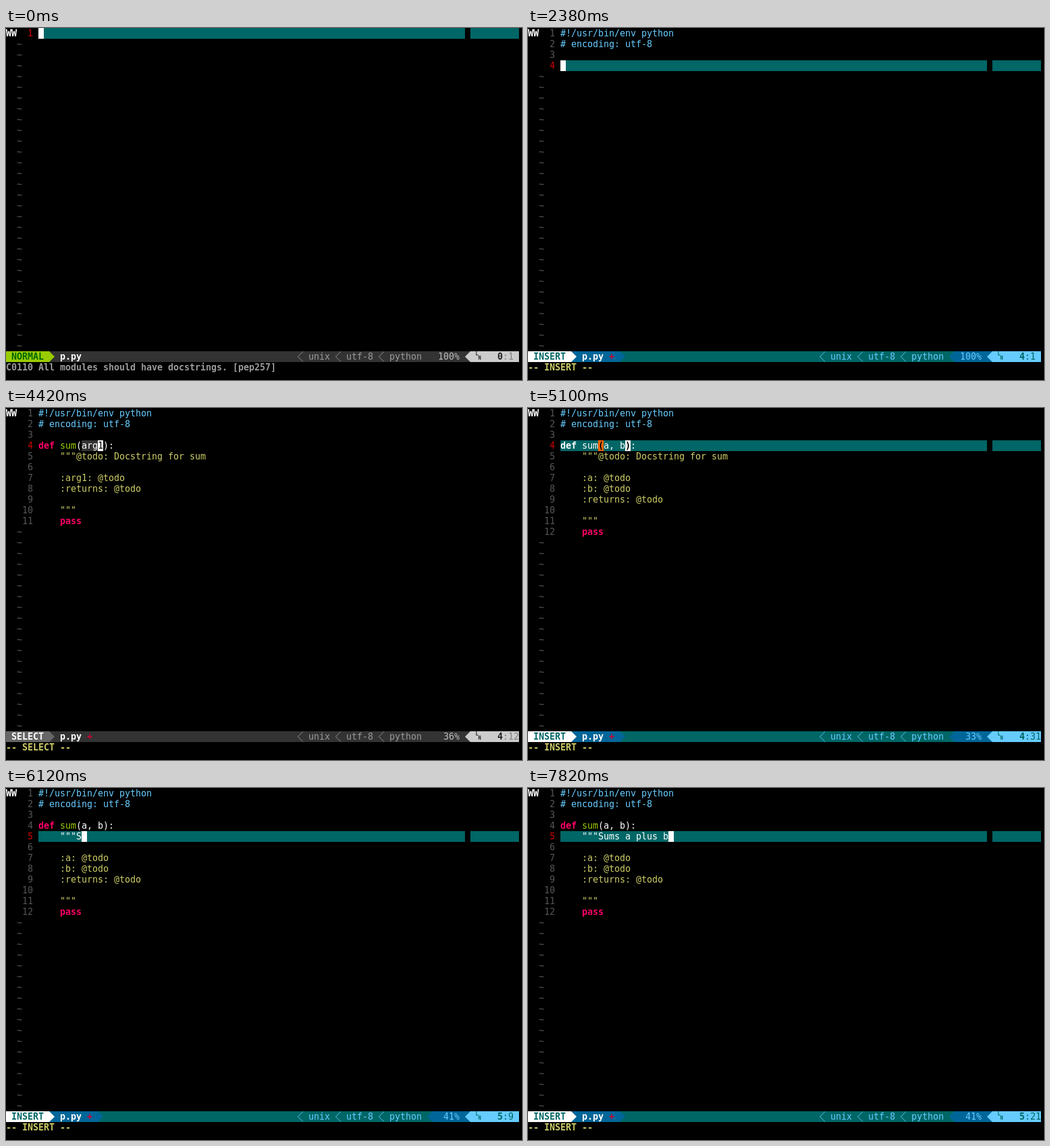
Recreate the animation shown at these times as an HTML page with a canvas. Size 860 by 588 pixels, loop 8000 ms.

```html
<!DOCTYPE html>
<html lang="en">
<head>
<meta charset="utf-8">
<title>Terminal editor</title>
<style>
html, body { margin: 0; width: 100%; height: 100%; overflow: hidden; background: #000; }
canvas { display: block; }
</style>
</head>
<body>
<canvas id="stage" width="860" height="588"></canvas>
<script>
const ctx = document.getElementById('stage').getContext('2d');
const CW = 9, CH = 18, COLS = 95, TEXT = 6, GUIDE = 85, STATUS = 30, LOOP = 8000;
const TEAL = '#006666', SKY = '#66ccff', YELLOW = '#cccc66', PINK = '#ff0066', LIME = '#99cc00';

const insertBar = {
  bg: TEAL, tag: '#ffffff', tagText: TEAL, file: '#006699', info: SKY,
  pct: '#006699', pctText: SKY, pos: SKY, line: TEAL, col: TEAL
};
const grayBar = {
  bg: '#333333', tag: LIME, tagText: '#006600', file: '#333333', info: '#999999',
  pct: '#333333', pctText: '#bbbbbb', pos: '#cccccc', line: '#222222', col: '#808080'
};
const bars = {
  NORMAL: grayBar,
  INSERT: insertBar,
  SELECT: { ...grayBar, tag: '#666666', tagText: '#ffffff' }
};

const head = ['#!/usr/bin/env python', '# encoding: utf-8', ''];

function body(name, sig, doc, args) {
  return [...head, `def ${name}(${sig}):`, `    """${doc}`, '',
    ...args.map(a => `    :${a}: @todo`), '    :returns: @todo', '', '    """', '    pass'];
}
const stub = name => '@todo: Docstring for ' + name;
const summed = doc => body('sum', 'a, b', doc, ['a', 'b']);
const one = (name, sig, docName, arg) => body(name, sig, stub(docName), [arg]);

// Each step: start, mode, lines, cursor row and column, plus optional details.
const steps = [];
function step(at, mode, lines, row, col, more = {}) {
  steps.push({ at, mode, lines, row, col, pos: `${row + 1}:${col + 1}`, ...more });
}
step(0, 'NORMAL', [''], 0, 0, { pos: '0:1', clean: true });
step(340, 'INSERT', [''], 0, 0, { pos: '0:1', clean: true });
step(1360, 'INSERT', ['#!'], 0, 2);
step(1700, 'INSERT', head, 2, 0);
step(2380, 'INSERT', [...head, ''], 3, 0);
step(2720, 'INSERT', [...head, 'd'], 3, 1);
step(3060, 'INSERT', [...head, 'de'], 3, 2, { match: true });
step(3400, 'INSERT', one('s', 'arg1', 's', 'arg1'), 3, 5, { pos: '4:29', pair: 10 });
step(3740, 'INSERT', one('su', 'arg1', 's', 'arg1'), 3, 6, { pos: '4:29', pair: 11, match: true });
step(4080, 'INSERT', one('sum', 'arg1', 'sum', 'arg1'), 3, 7, { pos: '4:31', pair: 12, match: true });
step(4420, 'SELECT', one('sum', 'arg1', 'sum', 'arg1'), 3, 11, { from: 8 });
step(4760, 'INSERT', one('sum', 'a,', 'sum', 'a'), 3, 10, { pair: 7 });
step(5100, 'INSERT', summed(stub('sum')), 3, 12, { pos: '4:31', pair: 7 });
step(5440, 'SELECT', summed(stub('sum')), 4, 30, { from: 7 });
function typed(at, text, match) {
  step(at, 'INSERT', summed(text), 4, 7 + text.length, { match });
}
typed(6120, 'S');
typed(6460, 'Su', true);
typed(6800, 'Sums a ');
typed(7140, 'Sums a p');
typed(7480, 'Sums a pl', true);
typed(7820, 'Sums a plus b');

function fill(col, row, n, color) {
  ctx.fillStyle = color;
  ctx.fillRect(col * CW, row * CH, n * CW, CH);
}

function put(text, col, row, color, bold) {
  ctx.font = (bold ? 'bold ' : '') + '15px "DejaVu Sans Mono", monospace';
  ctx.fillStyle = color;
  [...text].forEach((ch, i) => {
    if (ch !== ' ') ctx.fillText(ch, (col + i) * CW, row * CH + 14);
  });
}

function arrow(col, color, back, left) {
  fill(col, STATUS, 1, back);
  const x = col * CW, y = STATUS * CH;
  const base = left ? x + CW : x, tip = left ? x : x + CW;
  ctx.fillStyle = color;
  ctx.beginPath();
  ctx.moveTo(base, y);
  ctx.lineTo(tip, y + CH / 2);
  ctx.lineTo(base, y + CH);
  ctx.fill();
}

function chevron(col, color) {
  const x = col * CW, y = STATUS * CH;
  ctx.strokeStyle = color;
  ctx.lineWidth = 1;
  ctx.beginPath();
  ctx.moveTo(x + CW, y + 0.5);
  ctx.lineTo(x + 0.5, y + CH / 2);
  ctx.lineTo(x + CW, y + CH - 0.5);
  ctx.stroke();
}

function code(text, row, plain) {
  const def = /^def (\w+)/.exec(text);
  if (def) {
    put(text, TEXT, row, '#ffffff');
    fill(TEXT, row, 4 + def[1].length, plain ? TEAL : '#000000');
    put('def', TEXT, row, plain ? '#ffffff' : PINK, true);
    put(def[1], TEXT + 4, row, plain ? '#ffffff' : LIME);
  } else if (plain) {
    put(text, TEXT, row, '#ffffff');
  } else {
    const pass = text.trim() === 'pass';
    put(text, TEXT, row, pass ? PINK : text[0] === '#' ? SKY : YELLOW, pass);
  }
}

function statusBar(s) {
  const c = bars[s.mode], end = s.clean ? 15 : 17;
  fill(0, STATUS, COLS, c.bg);
  fill(0, STATUS, 8, c.tag);
  put(s.mode, 1, STATUS, c.tagText, true);
  fill(8, STATUS, end - 8, c.file);
  arrow(8, c.tag, c.file);
  arrow(end, c.file, c.bg);
  put('p.py', 10, STATUS, '#ffffff', true);
  if (!s.clean) put('+', 15, STATUS, '#cc0033', true);

  [[54, 'unix'], [61, 'utf-8'], [69, 'python']].forEach(([col, label]) => {
    chevron(col, c.info);
    put(label, col + 2, STATUS, c.info);
  });
  arrow(78, c.pct, c.bg, true);
  fill(79, STATUS, 6, c.pct);
  const pct = Math.floor((s.row + 1) * 100 / s.lines.length) + '%';
  put(pct.padStart(4), 80, STATUS, c.pctText);
  arrow(85, c.pos, c.pct, true);
  fill(86, STATUS, 9, c.pos);
  ctx.font = 'bold 8px "DejaVu Sans Mono", monospace';
  ctx.fillStyle = c.line;
  ctx.fillText('L', 782.5, 547);
  ctx.fillText('N', 787, 554);
  put(s.pos[0], 91, STATUS, c.line, true);
  put(s.pos.slice(1), 92, STATUS, c.col);
}

function message(s) {
  const row = STATUS + 1;
  if (s.mode === 'NORMAL') {
    put('C0110 All modules should have docstrings. [pep257]', 0, row, '#999999', true);
  } else if (s.match) {
    put('-- User defined completion (^U^N^P)', 0, row, YELLOW, true);
    put('match 1 of 2', 36, row, SKY, true);
  } else {
    put(`-- ${s.mode} --`, 0, row, YELLOW, true);
  }
}

function draw(s) {
  ctx.fillStyle = '#000000';
  ctx.fillRect(0, 0, 860, 588);
  const selecting = s.mode === 'SELECT';
  if (!selecting) {
    fill(TEXT, s.row, COLS - TEXT, TEAL);
    fill(GUIDE, s.row, 1, '#000000');
  }
  put('WW', 0, 0, '#ffffff', true);
  for (let r = 0; r < STATUS; r++) {
    if (r >= s.lines.length) {
      put('~', 2, r, '#555555');
      continue;
    }
    const here = r === s.row;
    put(String(r + 1).padStart(2), 3, r, here ? '#990000' : '#555555', here);
    code(s.lines[r], r, here && !selecting);
  }

  const line = s.lines[s.row];
  if (selecting) {
    fill(TEXT + s.from, s.row, s.col - s.from, '#333333');
    put(line.slice(s.from, s.col), TEXT + s.from, s.row, s.row === 3 ? '#ffffff' : YELLOW);
  }
  if (s.pair) {
    fill(TEXT + s.pair, s.row, 1, '#ff6600');
    put(line[s.pair], TEXT + s.pair, s.row, '#000000', true);
  }
  fill(TEXT + s.col, s.row, 1, '#ffffff');
  put(line[s.col] || '', TEXT + s.col, s.row, '#000000', !!s.pair);
  statusBar(s);
  message(s);
}

const start = performance.now();
function tick(now) {
  const t = Math.max(0, now - start) % LOOP;
  draw(steps.filter(s => s.at <= t).pop());
  requestAnimationFrame(tick);
}
tick(start);
</script>
</body>
</html>
```
